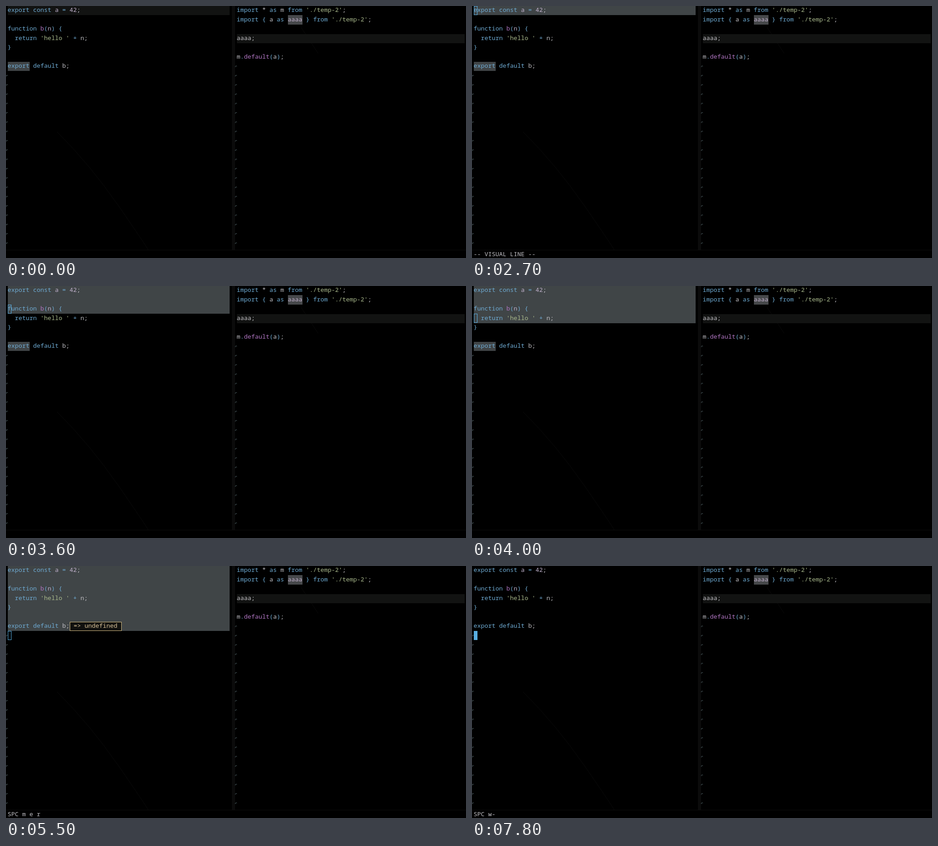
An HTML page for the animation above (8000 ms loop, 1010 by 555 pixels).

```html
<!DOCTYPE html>
<html lang="en">
<head>
<meta charset="utf-8">
<title>Editor session</title>
<style>
  html, body { margin: 0; width: 100%; height: 100%; overflow: hidden; background: #000; }
  svg { display: block; width: 1010px; height: 555px; }
  text { font: 13.333px "Noto Sans Mono", "DejaVu Sans Mono", monospace; white-space: pre; fill: #c0bfc4; }
  .k { fill: #6eabd3; }
  .f { fill: #b277c4; }
  .s { fill: #a9b98c; }
  .v { fill: #bfb0cb; }
  .p { fill: #c0bfc4; }
  .eob { fill: none; stroke: #56686d; }
  .faint { fill: none; stroke: #0b0b0b; }
</style>
</head>
<body>
<svg id="stage" viewBox="0 0 1010 555"></svg>
<script>
const LOOP = 8000, CHAR = 8, LEFT = 3.5, RIGHT = 506.5;
const stage = document.getElementById('stage');
const rowTop = row => Math.floor(row * 20.5);
const baseline = row => 13 + row * 20.5;

function add(tag, attrs, text, parent = stage) {
  const node = document.createElementNS('http://www.w3.org/2000/svg', tag);
  for (const key in attrs) node.setAttribute(key, attrs[key]);
  if (text !== undefined) node.textContent = text;
  return parent.appendChild(node);
}

const rect = (x, y, width, height, fill) => add('rect', { x, y, width, height, fill });

// Each token is a colour class followed by ':' and its text.
function codeLine(x, row, tokens) {
  const line = add('text', { x, y: baseline(row) });
  for (const token of tokens) add('tspan', { class: token[0] }, token.slice(2), line);
}

function endMarks(x, firstRow) {
  for (let row = firstRow; row < 26; row++) {
    add('path', { class: 'eob', d: `M${x} ${baseline(row) - 1.5}v-1q.5-2 2-1.5l1.5.5` });
  }
}

const leftCode = [
  ['k:export const ', 'v:a', 'k: = ', 'v:42', 'p:;'],
  [],
  ['k:function ', 'f:b', 'k:(', 'v:n', 'k:) {'],
  ['k:  return ', "s:'hello '", 'k: + ', 'p:n;'],
  ['k:}'],
  [],
  ['k:export default ', 'p:b;']
];
const rightCode = [
  ['k:import ', 'p:* ', 'k:as ', 'p:m ', 'k:from ', "s:'./temp-2'", 'p:;'],
  ['k:import { ', 'p:a ', 'k:as ', 'v:aaaa', 'k: } from ', "s:'./temp-2'", 'p:;'],
  [],
  ['p:aaaa;'],
  [],
  ['p:m', 'k:.', 'f:default', 'k:(', 'p:a', 'k:)', 'p:;']
];

// start, cursor row, cursor style, last selected row (-1: none), echo line
const steps = [
  [0, 0, 'none', -1, ''],
  [1400, 0, 'solid', -1, ''],
  [2700, 0, 'hollow', 0, '-- VISUAL LINE --'],
  [2800, 1, 'hollow', 1, ''],
  [3100, 2, 'hollow', 2, ''],
  [3300, 3, 'hollow', 3, ''],
  [3600, 2, 'hollow', 2, ''],
  [4000, 3, 'hollow', 3, ''],
  [4100, 4, 'hollow', 4, ''],
  [4200, 5, 'hollow', 5, ''],
  [4400, 6, 'hollow', 6, ''],
  [4600, 7, 'hollow', 6, ''],
  [5300, 7, 'hollow', 6, 'SPC m-'],
  [5400, 7, 'hollow', 6, 'SPC m e-'],
  [5500, 7, 'hollow', 6, 'SPC m e r'],
  [6800, 7, 'solid', -1, ''],
  [7800, 7, 'solid', -1, 'SPC w-']
];

rect(0, 0, 1010, 555, '#000');
add('path', { class: 'faint', d: 'M112 277Q185 350 247 440T312 537' });
add('path', { class: 'faint', d: 'M648 47L685 104' });
rect(496, 0, 7, 537, '#0b0b0b');
rect(0, 537, 1010, 1, '#0e0e0e');

const currentLine = rect(4, 0, 487, 20, '#121312');
rect(507, 62, 500, 20, '#121312');
const symbolMark = rect(4, 123, 48, 20, '#404446');
rect(619, 20, 32, 21, '#46484a');
const selection = rect(4, 0, 487, 0, '#404547');

endMarks(.5, 7);
endMarks(503.5, 6);
const solidCursor = rect(4, 0, 8, 20, '#58aee2');
leftCode.forEach((tokens, row) => codeLine(LEFT, row, tokens));
rightCode.forEach((tokens, row) => codeLine(RIGHT, row, tokens));
const cursorLetter = add('text', { x: LEFT, y: baseline(0), style: 'fill:#101214' }, 'e');
const hollowCursor = add('rect', { x: 4.5, width: 7, height: 19, fill: 'none', stroke: '#58aee2' });

const result = add('g', {});
add('rect', { x: 140.5, y: 123.5, width: 113, height: 19, fill: '#11110f', stroke: '#d5bc82' }, undefined, result);
add('text', { x: LEFT + 18 * CHAR + 1, y: baseline(6), style: 'fill:#d8c299' }, '=> undefined', result);
const echo = add('text', { x: LEFT, y: 551 }, '');

const show = (node, visible) => node.setAttribute('visibility', visible ? 'visible' : 'hidden');

function render(time) {
  const [, row, style, lastRow, message] = steps.findLast(step => step[0] <= time);
  show(currentLine, time < 2700);
  show(symbolMark, time < 4400);
  show(solidCursor, style === 'solid');
  show(cursorLetter, style === 'solid' && row === 0);
  show(hollowCursor, style === 'hollow');
  show(result, time >= 5500 && time < 6800);
  solidCursor.setAttribute('y', rowTop(row));
  hollowCursor.setAttribute('y', rowTop(row) + .5);
  selection.setAttribute('height', rowTop(lastRow + 1));
  echo.textContent = message;
}

const start = performance.now();
function tick() {
  render((performance.now() - start) % LOOP);
  requestAnimationFrame(tick);
}
tick();
</script>
</body>
</html>
```
